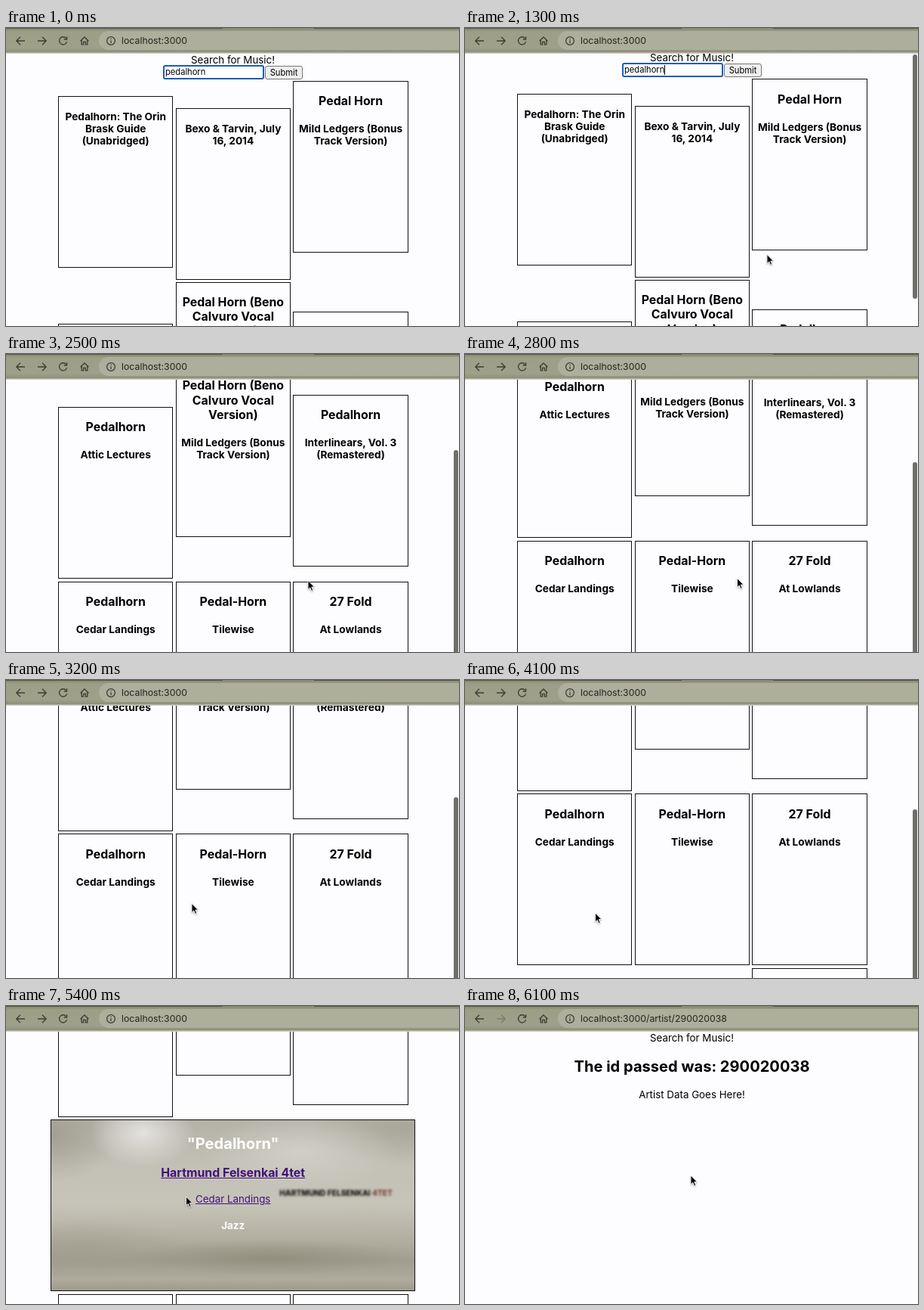
Write an HTML page that moves like this. It is 600 px wide and 394 px high and loops after 8000 ms.

```html
<!DOCTYPE html>
<html lang="en">
<head>
<meta charset="utf-8">
<title>Music search</title>
<style>
  * { box-sizing: border-box; margin: 0; }
  html, body { width: 100%; height: 100%; overflow: hidden; }
  body { background: #fdfcfe; color: #000; font: 13.35px/16px Inter, "Open Sans", sans-serif; }
  #stage { position: relative; width: 600px; height: 394px; overflow: hidden; background: #fdfcfe; }
  #stage div { position: absolute; }

  #bar { left: 0; top: 0; width: 600px; height: 34px; z-index: 3;
    background: linear-gradient(#85866d, #9d9e86 5px, #9fa089 26px, #8e8f78 32px, #d0d0c6 33px, #d0d0c6); }
  #bar .tab { top: 0; height: 1px; background: #54554a; }
  #pill { left: 123px; top: 4px; width: 500px; height: 25px; border-radius: 13px; background: #adae9b; }
  #url { left: 153px; top: 9px; font-size: 12.3px; color: #26261f; white-space: nowrap; }
  #bar svg { position: absolute; left: 0; top: 0; fill: none; stroke: #3d3e34; stroke-width: 1.3; }

  .line { left: 0; width: 601px; text-align: center; white-space: nowrap; }
  .field { left: 208px; top: 49px; width: 134px; height: 19px; border: 2px solid #1b5cc0; border-radius: 3px;
    background: #fff; font-size: 11.15px; line-height: 15px; padding-left: 1px; white-space: nowrap; }
  #caret { display: inline-block; width: 1px; height: 13px; background: #000; vertical-align: middle; margin-top: -2px; }
  .button { left: 343px; top: 50px; width: 50px; height: 18px; border: 1px solid #767676; border-radius: 3px;
    background: #efefef; font-size: 11.15px; text-align: center; }

  .card { width: 152.4px; height: 226.8px; border: 1px solid #111; overflow: hidden;
    text-align: center; font-weight: 700; }
  .card h3 { font-size: 15.9px; line-height: 19.3px; margin: 16.2px 0 18.8px; white-space: nowrap; }
  .card h4 { font-size: 13.7px; line-height: 16px; white-space: nowrap; margin: 0 -10px; }
  .card h4:first-child { margin-top: 18px; }

  #open { color: #fff; z-index: 1; }
  #open h2 { position: relative; font-size: 20.1px; line-height: 24px; margin-top: 18.5px; }
  #open h3 { position: relative; margin: 17.5px 0 16px; white-space: normal; }
  #open p { position: relative; font-weight: 400; line-height: 16px; }
  #open h4 { position: relative; margin-top: 19px; font-size: 13.4px; }
  #open u { color: #42127a; }
  #photo { left: 50%; top: 50%; width: 483px; height: 483px; margin: -241.5px;
    background:
      radial-gradient(70px 45px at 122px 146px, #e4e2df, #e4e2df00),
      radial-gradient(130px 50px at 330px 170px, #d5d3cbcc, #d5d3cb00),
      radial-gradient(190px 24px at 290px 310px, #8b8878aa, #8b887800),
      radial-gradient(150px 40px at 40px 300px, #9e9b8b99, #9e9b8b00),
      radial-gradient(130px 45px at 470px 140px, #a3a093aa, #a3a09300),
      radial-gradient(90px 60px at 0 150px, #9a978abb, #9a978a00),
      linear-gradient(#b3b1a5 128px, #c3c1b6 190px, #c6c4b8 240px, #b3b0a2 285px, #a19e8f 315px, #aeab9d 340px, #9b9889 356px); }
  #photo div { left: 303px; top: 217px; font-size: 10.2px; font-weight: 800; color: #111; filter: blur(1.6px); white-space: nowrap; }
  #photo i { font-style: normal; color: #7c3a36; }

  #thumb { left: 593px; width: 6px; height: 323px; border-radius: 3px; background: #706e6a; z-index: 2; }
  #cursor { position: absolute; left: 0; top: 0; z-index: 4; overflow: visible; filter: drop-shadow(0 1px 1px #0005); }
</style>
</head>
<body>
<div id="stage">
  <div id="search">
    <div id="form">
      <div class="line" style="top:34px">Search for Music!</div>
      <div class="field">pedalhorn<span id="caret"></span></div>
      <div class="button">Submit</div>
    </div>
    <div id="thumb"></div>
  </div>
  <div id="artist">
    <div class="line" style="top:34px">Search for Music!</div>
    <div class="line" style="top:68px;font:700 20.1px/24px Inter,sans-serif">The id passed was: 290020038</div>
    <div class="line" style="top:109px">Artist Data Goes Here!</div>
  </div>
  <div id="bar">
    <div class="tab" style="left:0;width:287px"></div>
    <div class="tab" style="left:408px;width:192px"></div>
    <div id="pill"></div>
    <svg width="160" height="33">
      <path d="M25 17H14M19 11.8L13.8 17L19 22.2"/>
      <path id="forward" d="M42 17H53M48 11.8L53.2 17L48 22.2"/>
      <path d="M79.6 13.6A5.1 5.1 0 1 0 80.6 18.2M80.6 11.3V15H76.8"/>
      <path d="M98.6 17.2L104 12L109.4 17.2M100.2 16V21.8H102.6V18.3H105.4V21.8H107.8V16"/>
      <circle cx="139" cy="17" r="5.4"/>
      <path d="M139 16.2V20M139 13.7V15"/>
    </svg>
    <div id="url"></div>
  </div>
  <svg id="cursor" width="12" height="18">
    <path d="M.5 .5V12.4L3.3 9.9L5.2 14.3L7.2 13.4L5.3 9.1H9Z" fill="#000" stroke="#fff" stroke-width=".9"/>
  </svg>
</div>
<script>
const LOOP = 8000, STEP = 100;
const CARD = 152.4, GAP = 3.3, WIDE = 483, TALL = 226.8, ROOM = 490, MID = 300.7;
const ROW3 = 621.2, ROW4 = 851.8;
const HOVER = 4300, GROW = 800, LEAVE = 6100;
const $ = id => document.getElementById(id);

// [column, top, title, album]
const CARDS = [
  [0, 90, "", "Pedalhorn: The Orin<br>Brask Guide<br>(Unabridged)"],
  [1, 106, "", "Bexo &amp; Tarvin, July<br>16, 2014"],
  [2, 70, "Pedal Horn", "Mild Ledgers (Bonus<br>Track Version)"],
  [0, 390.6, "Pedalhorn", "Attic Lectures"],
  [1, 335.6, "Pedal Horn (Beno<br>Calvuro Vocal<br>Version)", "Mild Ledgers (Bonus<br>Track Version)"],
  [2, 374.6, "Pedalhorn", "Interlinears, Vol. 3<br>(Remastered)"],
  [0, ROW3, "Pedalhorn", "Cedar Landings"],
  [1, ROW3, "Pedal-Horn", "Tilewise"],
  [2, ROW3, "27 Fold", "At Lowlands"],
  [0, ROW4 + 36, "", ""],
  [1, ROW4 + 36, "", ""],
  [2, ROW4, "", ""]
];

// [time, scroll]
const SCROLL = [
  [1200, 0], [1300, 2.6], [1700, 2.6], [1800, 10], [1900, 42], [2000, 96], [2100, 155],
  [2300, 254], [2500, 320.4], [2600, 343], [2800, 374], [3000, 398], [3200, 417.8],
  [3400, 438], [3600, 456], [3800, 470.8]
];

// [time, x, y]
const POINTER = [
  [300, 439, 304], [400, 399.5, 299], [2600, 399.5, 299], [2800, 360, 296], [3000, 297, 294],
  [3200, 245.5, 295], [3500, 190, 309], [3800, 169, 316], [4000, 170, 312], [4100, 172, 307.5],
  [5100, 172.5, 307.5], [5200, 186, 297], [5400, 238, 251.5], [5700, 274, 233], [6000, 298.5, 223.5]
];

function track(table, t) {
  const i = table.findIndex(row => row[0] > t);
  if (i === 0) return table[0].slice(1);
  if (i < 0) return table[table.length - 1].slice(1);
  const a = table[i - 1], b = table[i], k = (t - a[0]) / (b[0] - a[0]);
  return a.slice(1).map((v, n) => v + (b[n + 1] - v) * k);
}

const clamp = v => Math.min(1, Math.max(0, v));
const smooth = k => k * k * (3 - 2 * k);
const colX = c => 69 + c * (CARD + GAP);

function addCard(html, id = "") {
  const el = document.createElement("div");
  el.className = "card";
  el.id = id;
  el.innerHTML = html;
  $("search").append(el);
  return el;
}

const cards = CARDS.map(([, , title, album]) =>
  addCard((title && `<h3>${title}</h3>`) + `<h4>${album}</h4>`));
const open = addCard(`<div id="photo"><div>HARTMUND FELSENKAI <i>4TET</i></div></div>
  <h2>"Pedalhorn"</h2><h3><u>Hartmund Felsenkai 4tet</u></h3>
  <p><u>Cedar Landings</u></p><h4>Jazz</h4>`, "open");

function place(el, x, y) {
  el.style.left = x + "px";
  el.style.top = y + "px";
}

// The hovered card widens and pushes its neighbours onto the next line.
function reflow(width, scroll) {
  const rowWidth = n => width + n * (CARD + GAP);
  const beside = [2, 1, 0].find(n => rowWidth(n) <= ROOM);
  const left = MID - rowWidth(beside) / 2;
  place(open, left, ROW3 - scroll);
  cards.slice(7).forEach((el, i) => {
    const n = i - beside;
    if (n < 0) place(el, left + width + GAP + i * (CARD + GAP), ROW3 - scroll);
    else if (beside < 2) place(el, colX(n % 3), ROW4 + Math.floor(n / 3) * 230 - scroll);
  });
}

function draw(t) {
  const onArtist = t >= LEAVE, hovered = t >= HOVER;
  $("search").style.display = onArtist ? "none" : "";
  $("artist").style.display = onArtist ? "" : "none";
  $("url").textContent = "localhost:3000" + (onArtist ? "/artist/290020038" : "");
  $("forward").style.stroke = onArtist ? "#7b7c6b" : "";

  const [x, y] = track(POINTER, t);
  $("cursor").style.display = t < 300 ? "none" : "";
  $("cursor").style.transform = `translate(${x}px,${y}px)`;
  if (onArtist) return;

  const [scroll] = track(SCROLL, t);
  $("form").style.top = -scroll + "px";
  $("caret").style.visibility = (t + 900) % 1000 < 500 ? "visible" : "hidden";
  $("thumb").style.top = 34.5 + scroll * 0.289 + "px";
  $("thumb").style.opacity = t < 1300 ? 0 : 1 - clamp((t - 4200) / 300);

  CARDS.forEach(([col, top], i) => place(cards[i], colX(col), top - scroll));
  cards[6].style.display = hovered ? "none" : "";
  open.style.display = hovered ? "" : "none";
  if (!hovered) return;

  const grown = smooth(clamp((t - HOVER + STEP) / GROW));
  const width = CARD + (WIDE - CARD) * grown;
  open.style.width = width + "px";
  $("photo").style.transform = `scale(${Math.max(width, TALL) / WIDE})`;
  $("photo").style.opacity = clamp(grown * 1.5);
  reflow(width, scroll);
}

function tick() {
  draw(Math.floor(performance.now() % LOOP / STEP) * STEP);
  requestAnimationFrame(tick);
}
tick();
</script>
</body>
</html>
```
